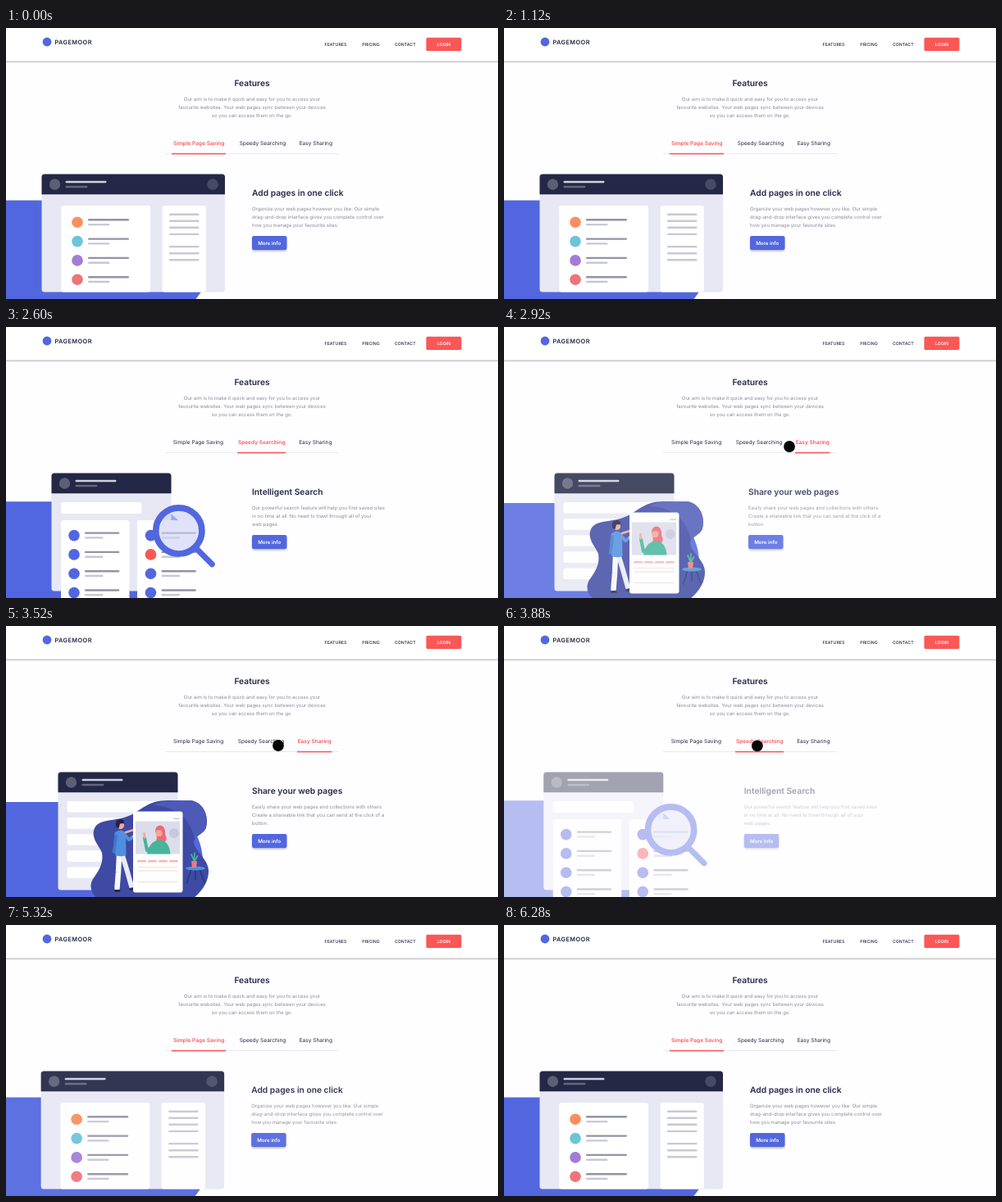
Write an HTML page that moves like this. It is 600 by 331 pixels and loops after 6360 ms.

```html
<!DOCTYPE html>
<html lang="en">
<head>
<meta charset="utf-8">
<title>Features</title>
<style>
  html, body { margin: 0; width: 100%; height: 100%; overflow: hidden; background: #fff; }
  svg { display: block; width: 600px; height: 331px; background: #fefdff; }
  text { font-family: Inter, Roboto, sans-serif; text-rendering: geometricPrecision; }
</style>
</head>
<body>
<svg id="stage" viewBox="0 0 600 331">
  <defs>
    <linearGradient id="shade" x1="0" y1="0" x2="0" y2="1">
      <stop offset="0" stop-color="#a9a9b0"/>
      <stop offset="1" stop-color="#a9a9b0" stop-opacity="0"/>
    </linearGradient>
    <filter id="soft" x="-20%" y="-40%" width="140%" height="200%">
      <feGaussianBlur stdDeviation="1.3"/>
    </filter>
  </defs>
</svg>
<script>
const LOOP = 6360, STEP = 40, FADE = 600, SHIFT = 12.5;
const BLUE = '#5267df', RED = '#fa5757', NAVY = '#242745', GREY = '#8b8c99';
const PALE = '#e7e8f4', MID = '#9293a6', LIGHT = '#c8c8d3';

const rect = (x, y, w, h, fill, r = 0) =>
  `<rect x="${x}" y="${y}" width="${w}" height="${h}" rx="${r}" fill="${fill}"/>`;
const dot = (x, y, r, fill) => `<circle cx="${x}" cy="${y}" r="${r}" fill="${fill}"/>`;
const bar = (x, y, w, fill, h = 2.4) => rect(x, y - h / 2, w, h, fill, h / 2);
const shape = (d, fill) => `<path d="${d}" fill="${fill}"/>`;
const stroke = (d, color, w) =>
  `<path d="${d}" fill="none" stroke="${color}" stroke-width="${w}" stroke-linecap="round" stroke-linejoin="round"/>`;
const text = (s, x, y, size, fill, weight = 400, anchor = 'start', spacing = 0) =>
  `<text x="${x}" y="${y}" font-size="${size}" fill="${fill}" font-weight="${weight}" text-anchor="${anchor}" letter-spacing="${spacing}">${s}</text>`;
const lines = (list, x, y, anchor) =>
  list.map((s, i) => text(s, x, y + i * 10.1, 5.98, GREY, 400, anchor)).join('');

// Pill running in from the left edge
const pill = (y, right) => rect(-150, y, right + 150, 146, BLUE, 73);

const windowFrame = (x, w) =>
  rect(x, 178.5, w, 144, PALE, 3.5) +
  shape(`M${x} 203.2V182q0-3.5 3.5-3.5H${x + w - 3.5}q3.5 0 3.5 3.5V203.2z`, NAVY) +
  dot(x + 16, 191, 6.7, '#5d5f76') +
  bar(x + 29, 188, 50, '#cfd0df', 2.5) +
  bar(x + 29, 194, 27, '#64667c');

const row = (x, y, color, long, short) =>
  dot(x, y, 6.8, color) +
  bar(x + 13, y - 3, long, MID) +
  bar(x + 13, y + 2.8, short, LIGHT);

const copy = (title, body) =>
  text(title, 300, 205.2, 10.25, NAVY, 600) +
  lines(body, 300, 222.7) +
  `<rect x="300.5" y="256" width="41.5" height="16.5" rx="2" fill="#55597a" opacity=".45" filter="url(#soft)"/>` +
  rect(300, 254, 42.5, 17, BLUE, 2) +
  text('More info', 321.25, 264.9, 6.15, '#fff', 600, 'middle');

const simpleArt = () =>
  pill(210.5, 249) +
  windowFrame(43.5, 223.5) +
  dot(252, 191, 6.8, '#484a65') +
  rect(67.3, 217, 108.7, 105.5, '#fff', 3) +
  rect(190.5, 217, 53.3, 105.5, '#fff', 3) +
  ['#fa8f5e', '#6bc5d8', '#a27dd8', '#ef747a']
    .map((c, i) => row(87, 237.3 + i * 23.3, c, 50, 26.5)).join('') +
  [0, 1, 2, 3, 4.9, 5.9, 6.9].map(i => bar(199, 227.7 + i * 8.05, 36.5, LIGHT)).join('');

const searchArt = () => {
  let s = pill(213.3, 230) + windowFrame(55.5, 146) +
    rect(67, 214, 98.6, 14, '#fff', 2.5) +
    rect(67, 236, 83.5, 110, '#fff', 3) + rect(160, 236, 83.3, 110, '#fff', 3);
  for (const x of [83, 176.5])
    for (let i = 0; i < 4; i++)
      s += row(x, 254.6 + i * 23.3, x > 100 && i === 1 ? RED : BLUE, 42.3, 22.5);
  return s + stroke('M231 269.5L251.3 289.7', BLUE, 7) +
    '<circle cx="210.8" cy="248.9" r="28" fill="#cbd1f6" fill-opacity=".62"/>' +
    `<circle cx="210.8" cy="248.9" r="28.1" fill="none" stroke="${BLUE}" stroke-width="7.7"/>`;
};

const person = () =>
  stroke('M138 280L137 301L135.5 320', '#f7f7fc', 6.5) +
  stroke('M142 280L148 300L153 318', '#e9eaf5', 6) +
  stroke('M133.5 323.5H138M152 321.5L156 320.5', '#252849', 3) +
  shape('M133 252Q139 247 146 252L146.5 280Q140 282.5 133.5 280Q130 265 133 252z', '#4f8fe0') +
  stroke('M144 254L150 261L158 255.5', '#4f8fe0', 4) +
  stroke('M155 257L163.5 252', '#f4a993', 2.5) +
  stroke('M134 256L133 267L131.5 276', '#3f79cc', 3.6) +
  stroke('M146 252L154 249.5', '#f4a993', 2.8) +
  dot(139.5, 243.5, 4.6, '#f4a993') +
  shape('M134 244Q133 236.5 139 236Q145 236 144 241L139 241.5L137.5 247Q134.5 247 134 244z', '#20234a');

const profile = () =>
  rect(155, 226.5, 60.5, 99, '#fff', 3) +
  bar(204, 235.2, 8, '#c9cbdc', 1.4) +
  rect(158, 238.5, 54, 40, '#dcddeb') +
  dot(205, 253, 6, '#c5c9e0') +
  shape('M182 251Q182 243.5 188.5 243.5Q195 245 194 255Q198 260 193 265L183 264Q185 257 182 251z', '#ee6878') +
  shape('M172 278.5Q175 263 186 261.5Q199 261 200.5 278.5z', '#45b59b') +
  stroke('M179 270L172 274L169 259', '#45b59b', 4) +
  stroke('M169 258L168.5 253.5', '#f4a993', 2.8) +
  dot(186.5, 253, 4.1, '#f4a993') +
  [160, 173, 186, 199].map(x => bar(x, 287.2, 11, '#f5b9b4', 2.6)).join('') +
  [294.5, 299, 312.5].map(y => bar(160, y, 50, '#f8e4e4', 1.5)).join('');

const stool = () =>
  stroke('M226 297L220.5 314M231 298V310M236 297L242 313', '#243b76', 1.6) +
  `<ellipse cx="231" cy="296" rx="12" ry="2.4" fill="#4d91d8"/>` +
  shape('M226 287H233L232 295H227z', '#ef7b83') +
  stroke('M229.5 287L226 279M229.5 287L230 277M230 287L233.5 281', '#45b59b', 1.7);

const shareArt = () =>
  pill(215, 240) + windowFrame(63.5, 146) +
  [0, 1, 2, 3, 4].map(i => rect(74.5, 214 + i * 20.1, 122.5, 13.6, '#fff', 2.3)).join('') +
  shape('M108 247C113 235 135 239 152 231C166 224 174 213 197 213H224C239 214 248 230 244 246C242 254 229 256 229 264C230 275 246 284 247 298C248 313 236 331 216 340H125C107 334 99 321 106 309C114 298 119 289 117 277C113 267 103 259 108 247z', '#3e4aa3') +
  shape('M180 219C188 213 202 213 224 213C239 214 248 230 244 246C242 253 232 256 230 261C226 236 207 220 180 219z', '#4d5ab8') +
  person() + profile() + stool();

const panels = [
  simpleArt() + copy('Add pages in one click', ['Organize your web pages however you like. Our simple',
    'drag-and-drop interface gives you complete control over', 'how you manage your favourite sites.']),
  searchArt() + copy('Intelligent Search', ['Our powerful search feature will help you find saved sites',
    'in no time at all. No need to trawl through all of your', 'web pages.']),
  shareArt() + copy('Share your web pages', ['Easily share your web pages and collections with others.',
    'Create a shareable link that you can send at the click of a', 'button.'])
];

const labels = ['Simple Page Saving', 'Speedy Searching', 'Easy Sharing'];
const centres = [[235.1, 313, 377.8], [234.3, 311.8, 377.3], [234.6, 311, 376.3]];
const underline = [[202, 66], [282, 59], [355, 42.3]];
const tabs = k => labels.map((s, i) =>
  text(s, centres[k][i], 143.1, 6.55, i === k ? RED : NAVY, i === k ? 600 : 400, 'middle')).join('') +
  rect(underline[k][0], 152.8, underline[k][1], 1.6, RED);

const header =
  rect(0, 40.3, 600, 2.6, 'url(#shade)') + rect(0, 0, 600, 40.4, '#fff') +
  dot(50, 17, 5.4, BLUE) +
  text('PAGEMOOR', 59.4, 19.7, 7.4, NAVY, 600, 'start', 0.4) +
  [['FEATURES', 402], ['PRICING', 445], ['CONTACT', 486.8]]
    .map(([s, x]) => text(s, x, 21.8, 5.25, NAVY, 500, 'middle')).join('') +
  rect(512.4, 11.8, 43, 16.2, RED, 1.7) +
  text('LOGIN', 533.9, 21.8, 5.25, '#fff', 600, 'middle');

const intro =
  text('Features', 300, 71.2, 10.25, NAVY, 600, 'middle') +
  lines(['Our aim is to make it quick and easy for you to access your',
    'favourite websites. Your web pages sync between your devices',
    'so you can access them on the go.'], 300, 88.8, 'middle') +
  rect(194, 153.2, 212, 0.6, '#dfdfe6');

const stage = document.getElementById('stage');
stage.insertAdjacentHTML('beforeend', header + intro +
  panels.map((p, i) => `<g class="tabs">${tabs(i)}</g><g class="panel">${p}</g>`).join('') +
  `<g id="cursor">${dot(0, 0, 6.9, '#050505')}</g>`);

const tabSets = [...stage.querySelectorAll('.tabs')];
const views = [...stage.querySelectorAll('.panel')];
const cursor = document.getElementById('cursor');

// [time, panel] and [time, x, y]
const swaps = [[-FADE, 0], [1430, 1], [2645, 2], [3780, 1], [4966, 0]];
const path = [[2640, 357, 146], [2920, 348, 146], [3520, 332, 146],
  [3780, 320, 146.3], [4360, 255.3, 147], [4960, 242, 147]];

function draw(now) {
  const t = Math.floor((now % LOOP) / STEP) * STEP;
  const [start, active] = swaps.filter(s => s[0] <= t).pop();
  const p = Math.min(1, (t - start) / FADE);
  const eased = 1 - (1 - p) ** 3;
  views.forEach((v, i) => {
    const shown = i === active ? 'inline' : 'none';
    v.style.display = tabSets[i].style.display = shown;
  });
  views[active].setAttribute('opacity', eased);
  views[active].setAttribute('transform', `translate(${(eased - 1) * SHIFT} 0)`);

  const n = path.findIndex(k => k[0] > t);
  cursor.style.display = n > 0 ? 'inline' : 'none';
  if (n > 0) {
    const a = path[n - 1], b = path[n], f = (t - a[0]) / (b[0] - a[0]);
    cursor.setAttribute('transform',
      `translate(${a[1] + (b[1] - a[1]) * f} ${a[2] + (b[2] - a[2]) * f})`);
  }
}

const begin = performance.now();
function tick() {
  draw(performance.now() - begin);
  requestAnimationFrame(tick);
}
tick();
</script>
</body>
</html>
```
